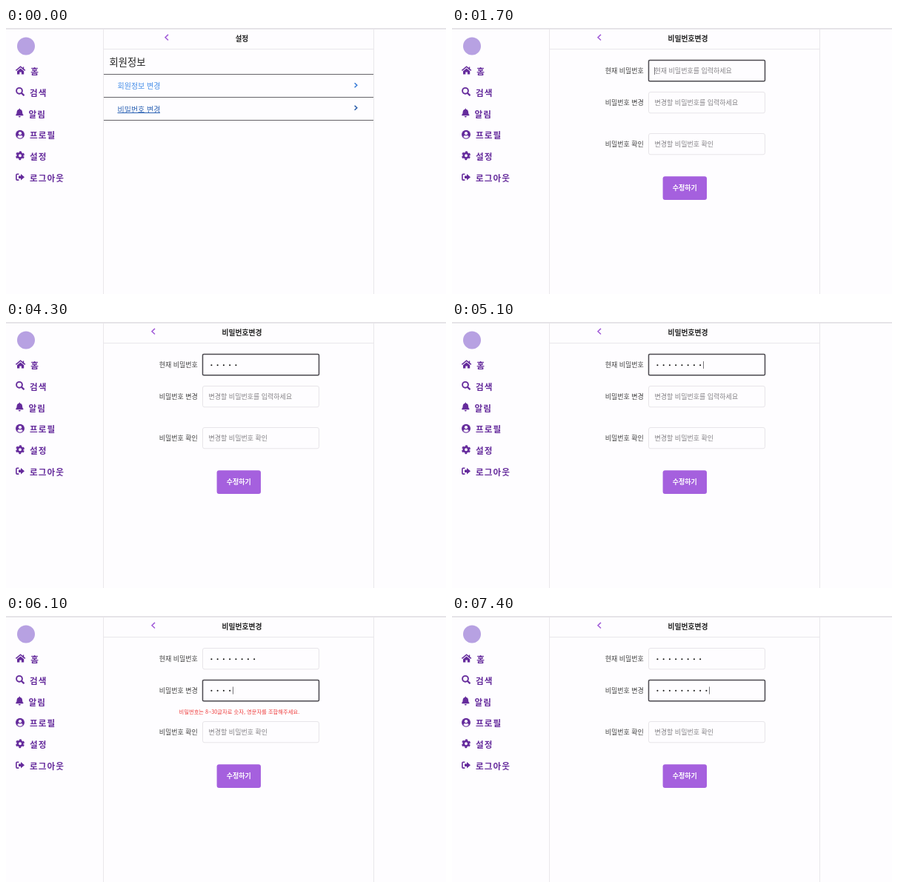
Recreate the animation shown at these times as an HTML page. Size 594 by 359 pixels, loop 8000 ms.

```html
<!DOCTYPE html>
<html lang="ko">
<head>
<meta charset="utf-8">
<title>비밀번호 변경</title>
<style>
html, body { margin: 0; width: 100%; height: 100%; overflow: hidden; background: #fefdff; }
svg { display: block; }
text { font-family: "Noto Sans CJK KR", "Noto Sans CJK", sans-serif; white-space: pre; }
.menu { letter-spacing: 1.1px; font-weight: 700; }
.icon { fill: #652b9c; }
.line { fill: none; stroke: #652b9c; }
.chevron { fill: none; stroke-width: 1.5; }
</style>
</head>
<body>
<svg id="stage" width="594" height="359" viewBox="0 0 594 359"></svg>
<script>
const LOOP = 8000, FORM_AT = 1100, SECOND_AT = 5400;
const stage = document.getElementById('stage');

// Text is placed by the vertical middle of its Hangul glyphs.
const text = (s, x, mid, size, fill, extra = '') =>
  `<text x="${x}" y="${mid + size * .38}" font-size="${size}" fill="${fill}" ${extra}>${s}</text>`;
const centred = (s, x, mid, size, fill, weight = 400) =>
  text(s, x, mid, size, fill, `text-anchor="middle" font-weight="${weight}"`);
const rect = (x, y, w, h, fill, extra = '') =>
  `<rect x="${x}" y="${y}" width="${w}" height="${h}" fill="${fill}" ${extra}/>`;
const chevron = (x, y, dx, dy, colour) =>
  `<path class="chevron" stroke="${colour}" d="M${x - dx} ${y - dy}L${x + dx} ${y}L${x - dx} ${y + dy}"/>`;
const at = (x, y, body) => `<g transform="translate(${x} ${y})">${body}</g>`;

const icons = {
  home: `<path class="line" stroke-width="1.5" d="M.4 6.2L6.6 1L12.8 6.2"/>
    <path class="icon" d="M2 7L6.6 3.2L11.2 7V11.4H7.9V8.3H5.3V11.4H2ZM9.7 1.2H11.2V5H9.7Z"/>`,
  search: `<circle class="line" cx="5" cy="5" r="3.9" stroke-width="1.9"/>
    <path class="line" stroke-width="2.2" d="M7.8 7.8L11.5 11.5"/>`,
  bell: `<path class="icon" d="M5.3 0Q6 0 6 1.2Q9 1.9 9 5Q9 7.6 10.4 8.5Q10.8 9.6 9.9 9.6H.7Q-.2 9.6.2 8.5Q1.6 7.6 1.6 5Q1.6 1.9 4.6 1.2Q4.6 0 5.3 0ZM3.8 10.3H6.8Q6.6 12 5.3 12Q4 12 3.8 10.3Z"/>`,
  user: `<circle class="icon" cx="6" cy="6" r="6"/><circle cx="6" cy="4.5" r="2.1" fill="#fefdff"/>
    <path fill="#fefdff" d="M2.4 9.4Q2.8 7.4 4.4 7.4Q6 8 7.6 7.4Q9.2 7.4 9.6 9.4Q8.2 11 6 11Q3.8 11 2.4 9.4Z"/>`,
  cog: `<circle class="line" cx="6" cy="6" r="3.3" stroke-width="2.7"/>
    <circle class="line" cx="6" cy="6" r="5" stroke-width="2" stroke-dasharray="2.7 2.536" transform="rotate(14.5 6 6)"/>`,
  exit: `<path class="line" stroke-width="1.6" d="M4.4 1.6H2Q.9 1.6.9 2.7V8.3Q.9 9.4 2 9.4H4.4"/>
    <path class="icon" d="M4 3.8H7V1.2L12 5.5L7 9.8V7.2H4Z"/>`
};
const menu = [
  ['home', 51.2, '홈', 33.2], ['search', 79.8, '검색', 32], ['bell', 108.6, '알림', 30.4],
  ['user', 137.7, '프로필', 32], ['cog', 166.2, '설정', 32], ['exit', 195.7, '로그아웃', 32]
];

const frame = rect(0, 0, 594, 2, '#e6e4e8') + rect(131, 2, 1, 357, '#e9e7eb') +
  rect(496, 2, 1, 357, '#e9e7eb') + rect(132, 28, 364, 1, '#e9e7eb') +
  '<circle cx="27" cy="24.5" r="12" fill="#b7a1e2"/>' +
  menu.map(([icon, y, label, x], i) =>
    at(13, y, icons[icon]) + text(label, x, 58.5 + i * 28.8, 11.6, '#652b9c', 'class="menu"')).join('');

const settings = chevron(217, 12.7, -2, 3.8, '#a05ad8') +
  centred('설정', 318.3, 14, 9.7, '#222', 700) +
  text('회원정보', 139.5, 45.5, 13.3, '#222') +
  [62, 93, 124].map(y => rect(132, y, 364, 1, '#656368')).join('') +
  text('회원정보 변경', 150.5, 78.5, 10, '#438ce8') + chevron(472.2, 77.2, 1.6, 3, '#3479d8') +
  text('비밀번호 변경', 150.5, 109.7, 10, '#2c62b4') + rect(150.5, 114, 57.5, 1, '#2c62b4') +
  chevron(472.2, 107.8, 1.6, 3, '#2459a8');

const field = (id, y, label, hint) =>
  text(label, 206.7, y + 14.3, 9, '#444') +
  `<rect id="box${id}" x="265.5" y="${y + .5}" width="157" height="28.3" fill="#fefdff"/>` +
  `<g id="hint${id}">${text(hint, 273.5, y + 14.3, 9, '#858387')}</g><g id="dots${id}"></g>`;

const form = chevron(199, 12.7, -2, 3.8, '#a05ad8') +
  centred('비밀번호변경', 318.5, 13.9, 9.8, '#222', 700) +
  field(0, 43, '현재 비밀번호', '현재 비밀번호를 입력하세요') +
  field(1, 86, '비밀번호 변경', '변경할 비밀번호를 입력하세요') +
  field(2, 142, '비밀번호 확인', '변경할 비밀번호 확인') +
  `<g id="error">${text('비밀번호는 8~30글자로 숫자, 영문자를 조합해주세요.', 233.5, 129, 7.3, '#ee3b3b')}</g>` +
  rect(284.6, 200.3, 59.4, 31.6, '#a560de', 'rx="3"') +
  centred('수정하기', 314.2, 216, 9, '#fff', 700) +
  rect(0, 0, 1, 10, '#77757a', 'id="caret"');

stage.innerHTML = frame + `<g id="settings">${settings}</g><g id="form">${form}</g>`;

const el = id => document.getElementById(id);
const show = (id, on) => el(id).setAttribute('display', on ? 'inline' : 'none');
const between = (t, a, b) => t >= a && t < b;

// Each field: [time, number of characters held from then on]
const typing = [
  [[2800, 1], [2900, 2], [3000, 3], [3200, 4], [3500, 5], [3700, 6], [4300, 5], [4700, 6], [4800, 7], [5100, 8]],
  [[5600, 1], [5800, 2], [5900, 3], [6100, 4], [6300, 5], [6400, 6], [6600, 7], [6800, 8], [7400, 9]],
  []
];
const fieldMid = [58, 100.5, 156.5];
const countAt = (steps, t) => steps.reduce((n, [time, count]) => t >= time ? count : n, 0);

function draw(t) {
  show('settings', t < FORM_AT);
  show('form', t >= FORM_AT);
  const focus = t >= SECOND_AT ? 1 : t >= 1700 ? 0 : -1;
  const counts = typing.map(steps => countAt(steps, t));
  counts.forEach((n, i) => {
    const box = el('box' + i), on = i === focus;
    box.setAttribute('stroke', on ? '#4b494f' : '#e7e5e9');
    box.setAttribute('stroke-width', on ? 1.5 : 1);
    box.setAttribute('rx', on ? 1.5 : 2.5);
    show('hint' + i, n === 0);
    el('dots' + i).innerHTML = Array.from({ length: n }, (_, k) =>
      `<circle cx="${277.4 + k * 8.25}" cy="${fieldMid[i] + .2}" r="1.05" fill="#111"/>`).join('');
  });
  show('error', between(t, SECOND_AT, 7000));
  show('caret', between(t, 1700, 2200) || between(t, 2700, 4200) || t >= 4700);
  if (focus >= 0) {
    el('caret').setAttribute('x', Math.round(273 + counts[focus] * 8.22));
    el('caret').setAttribute('y', focus ? 95.5 : 53);
  }
}

const start = performance.now();
function tick() {
  draw((performance.now() - start) % LOOP);
  requestAnimationFrame(tick);
}
tick();
</script>
</body>
</html>
```
